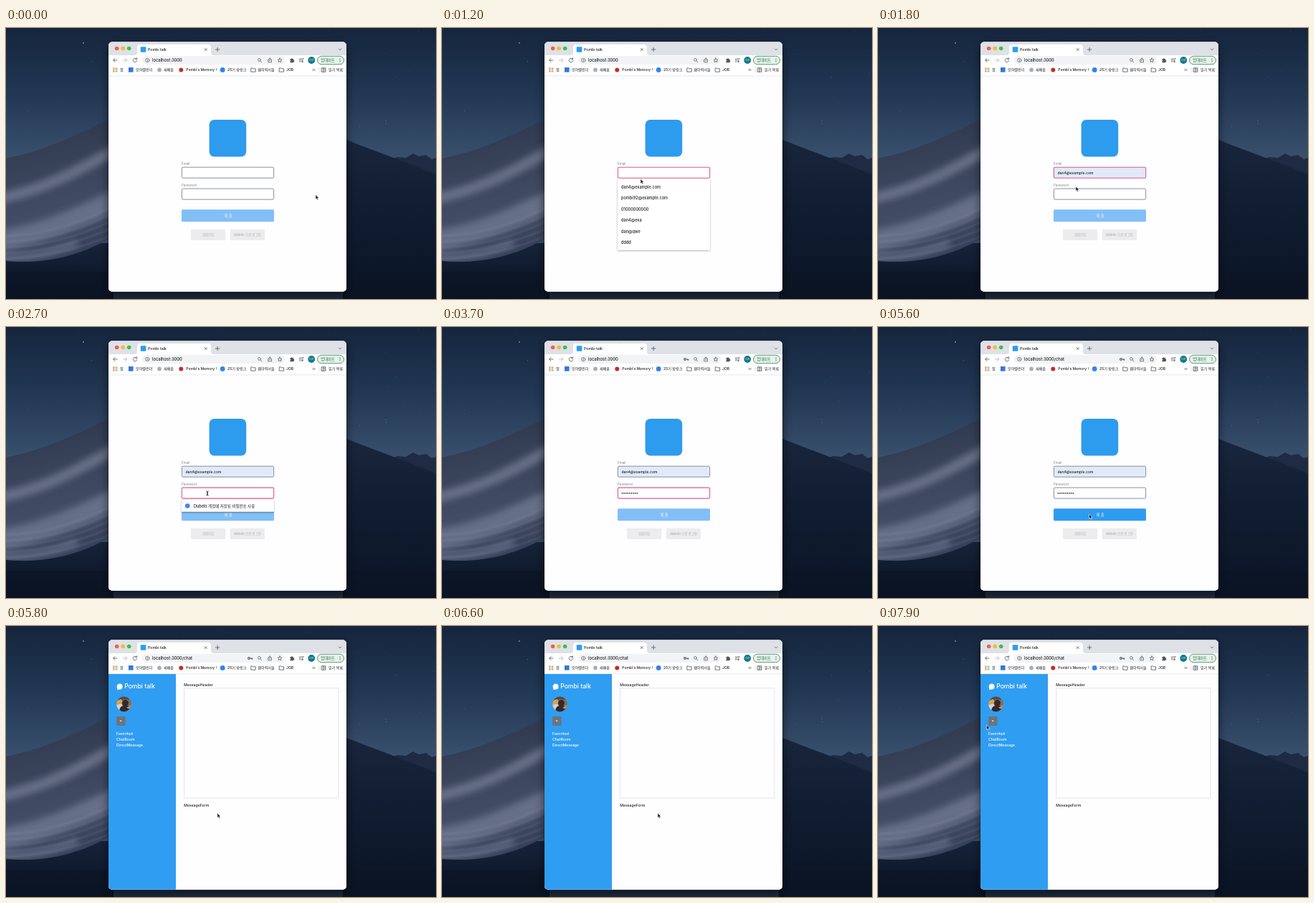
An HTML page that plays this animation: 600 by 378 pixels, repeating every 8000 ms.

```html
<!DOCTYPE html>
<html lang="ko">
<head>
<meta charset="utf-8">
<title>Pombi talk</title>
<style>
html, body { margin: 0; width: 100%; height: 100%; overflow: hidden; background: #101c2e; }
svg { display: block; width: 600px; height: 378px; }
text { font: 500 5.2px Inter, "Noto Sans CJK KR", "Noto Sans CJK", sans-serif; fill: #202124; white-space: pre; }
.line { fill: none; stroke: #5f6368; stroke-width: .9; stroke-linecap: round; stroke-linejoin: round; }
.bar text { font-size: 5.1px; }
.label { font-size: 4.5px; font-weight: 400; fill: #84868c; }
.field { fill: #fff; stroke: #7d8590; stroke-width: .9; }
.field.auto { fill: #e1eaf8; }
.field.focus { stroke: #dc5c8b; stroke-width: 1.1; }
.items text { font-size: 5.6px; }
.mid { text-anchor: middle; }
.side text { fill: #fff; }
#chat text { font-size: 5.15px; }
</style>
</head>
<body>
<svg viewBox="0 0 600 378">
  <defs>
    <linearGradient id="sky" x2="0" y2="1">
      <stop stop-color="#15253d"/><stop offset=".25" stop-color="#223854"/>
      <stop offset=".5" stop-color="#3b526f"/>
    </linearGradient>
    <linearGradient id="dune" x1=".3" y1="0" x2=".45" y2="1">
      <stop stop-color="#2b364c"/><stop offset=".35" stop-color="#384259"/>
      <stop offset=".7" stop-color="#434d66"/><stop offset="1" stop-color="#333e56"/>
    </linearGradient>
    <linearGradient id="ground" x2="0" y2="1">
      <stop stop-color="#16233a"/><stop offset="1" stop-color="#091221"/>
    </linearGradient>
    <linearGradient id="slope" x2="0" y2="1">
      <stop stop-color="#18263d"/><stop offset=".4" stop-color="#111d32"/><stop offset="1" stop-color="#0a1424"/>
    </linearGradient>
    <filter id="blur" x="-20%" y="-50%" width="140%" height="200%"><feGaussianBlur stdDeviation="5"/></filter>
    <filter id="soft"><feGaussianBlur stdDeviation="1"/></filter>
    <filter id="shade" x="-20%" y="-20%" width="140%" height="150%">
      <feDropShadow dx="0" dy="5" stdDeviation="7" flood-color="#000" flood-opacity=".55"/>
    </filter>
    <filter id="lift" x="-10%" y="-20%" width="120%" height="150%">
      <feDropShadow dx="0" dy=".8" stdDeviation=".9" flood-color="#000" flood-opacity=".35"/>
    </filter>
    <clipPath id="frame"><rect x="143" y="19.5" width="332" height="348.3" rx="5"/></clipPath>
    <clipPath id="round"><circle cx="164.5" cy="109" r="10.4"/></clipPath>
    <clipPath id="sand"><path id="hill" d="M0 182C50 172 95 152 150 124V290C105 318 55 330 0 325Z"/></clipPath>
  </defs>

  <!-- desert at night -->
  <rect width="600" height="378" fill="url(#sky)"/>
  <g id="stars" fill="#b9cbe0"></g>
  <path d="M530 185L546 180 558 181 568 175 576 179 586 177 594 183 600 181V215H530Z" fill="#1e2b43"/>
  <path d="M470 154C510 170 550 184 600 204V378H470Z" fill="url(#slope)"/>
  <rect y="300" width="150" height="78" fill="url(#ground)"/>
  <use href="#hill" fill="url(#dune)"/>
  <g clip-path="url(#sand)" fill="none">
    <g stroke="#7f889f" filter="url(#blur)">
      <path d="M-20 240C50 228 100 200 170 160" stroke-width="15" opacity=".65"/>
      <path d="M-20 298C40 292 90 270 170 232" stroke-width="28" opacity=".6"/>
      <path d="M-20 320C30 322 60 316 100 300" stroke-width="9" opacity=".6"/>
    </g>
    <g id="ripples" stroke="#a2a9bd" filter="url(#soft)"></g>
  </g>
  <rect y="340" width="600" height="38" fill="#0b1525" opacity=".6"/>

  <!-- browser -->
  <rect x="143" y="19.5" width="332" height="348.3" rx="5" fill="#fff" stroke="#0a111d" stroke-opacity=".5" stroke-width=".8" filter="url(#shade)"/>
  <g clip-path="url(#frame)">
    <rect x="143" y="19" width="332" height="350" fill="#fefdff"/>
    <rect x="143" y="19" width="332" height="19" fill="#dee1e6"/>
    <path d="M179 38Q183 38 183 34V27Q183 23 187 23H282Q286 23 286 27V34Q286 38 290 38Z" fill="#fff"/>
    <rect x="143" y="38" width="332" height="28.5" fill="#fff"/>
    <path d="M143 66.8H475" stroke="#dfe1e5" stroke-width=".7"/>
    <circle cx="154.7" cy="28.5" r="2.8" fill="#ee5f56"/>
    <circle cx="163.2" cy="28.5" r="2.8" fill="#f2bb33"/>
    <circle cx="171.7" cy="28.5" r="2.8" fill="#3dbf4a"/>
    <rect x="187.8" y="26.2" width="7.6" height="7.6" rx="1" fill="#2c9cf0"/>
    <text x="198" y="31.9">Pombi talk</text>
    <path class="line" d="M277.2 28.6l3 3m0-3l-3 3M292.4 30h5.4m-2.7-2.7v5.4M464.3 29l1.8 1.8 1.8-1.8"/>

    <path class="line" d="M155 45H149.7m2.4-2.5l-2.5 2.5 2.5 2.5"/>
    <path class="line" style="stroke:#b8babd" d="M163.5 45H168.8m-2.4-2.5l2.5 2.5-2.5 2.5"/>
    <path class="line" d="M182.2 43.2A2.8 2.8 0 1 0 182.8 45.6M182.6 41.8v1.9h-1.9"/>
    <rect x="190" y="39" width="199" height="12" rx="6" fill="#f1f3f4"/>
    <circle class="line" cx="197.3" cy="45" r="2.7" style="stroke-width:.7"/>
    <path class="line" d="M197.3 44.8v1.5m0-2.8v.1"/>
    <text id="url" x="204" y="47.1" style="font-size:5.8px"></text>
    <g id="key" class="line"><circle cx="339" cy="45" r="1.4" style="stroke-width:1.2"/><path d="M340.6 45h3.2v1.2m-1.4-1.2v1" style="stroke-width:1.1"/></g>
    <g class="line" style="stroke-width:.8">
      <circle cx="353.5" cy="44.4" r="1.9"/><path d="M355 46l1.8 1.8"/>
      <path d="M366.7 44h-1v3.8h4.8V44h-1M368.1 46v-4m-1.3 1.2l1.3-1.2 1.3 1.2"/>
      <path d="M382 42l.9 2 2.1.2-1.6 1.4.5 2.1-1.9-1.1-1.9 1.1.5-2.1-1.6-1.4 2.1-.2z"/>
      <path d="M409.2 43h4m-4 1.9h3m-3 1.9h2M414 47v-4.5h1.3"/><circle cx="413.2" cy="47" r=".7"/>
    </g>
    <path d="M396.3 43.3h1.5a1 1 0 0 1 2 0h1.6v1.6a1 1 0 0 1 0 2v1.3h-5.1v-1.4a1 1 0 0 0 0-2z" fill="#505458"/>
    <circle cx="426.2" cy="45" r="4.9" fill="#12798a"/>
    <text class="mid" x="426.2" y="46.3" style="font-size:3.6px;fill:#d5ecef">다온</text>
    <rect x="434.5" y="39.3" width="37" height="11.4" rx="5.7" fill="#e8f2ec" stroke="#388056" stroke-width=".8"/>
    <text x="439.3" y="47" style="font-size:5.3px;fill:#1e7340">업데이트</text>
    <path class="line" d="M466 42.9v.1m0 1.9v.1m0 1.9v.1" style="stroke:#286c45;stroke-width:1.2"/>

    <g class="bar">
      <g id="apps"></g>
      <text x="159" y="60.3">앱</text>
      <rect x="171" y="55" width="6.6" height="6.6" fill="#3479d6"/>
      <text x="181" y="60.3">모아캘린더</text>
      <circle cx="214" cy="58.4" r="2.8" fill="#a8adb2"/>
      <text x="220" y="60.3">새배움</text>
      <circle cx="244.3" cy="58.5" r="3" fill="#c52d2d"/>
      <text x="251.3" y="60.3" style="font-size:4.95px">Pombi's Memory !</text>
      <circle cx="302.2" cy="58.4" r="3.4" fill="#3283ed"/>
      <text x="309" y="60.3">25기 방링크</text>
      <path id="folder" class="line" d="M342.2 55.9h2l.8.9h3.2v4.3h-6z"/>
      <text x="351.3" y="60.3">웹이력서들</text>
      <use href="#folder" x="39.4"/>
      <text x="391" y="60.3">JOB</text>
      <path class="line" d="M428 57.2l1.2 1.2-1.2 1.2m2-2.4l1.2 1.2-1.2 1.2"/>
      <path d="M436.8 54.5v8" stroke="#c9ccd0" stroke-width=".6"/>
      <path class="line" d="M440.5 55.8h5.4v5.4h-5.4zM442.5 55.8v5.4m1.4-3.8h1m-1 1.8h1"/>
      <text x="450" y="60.3">읽기 목록</text>
    </g>

    <g id="login">
      <rect x="283.6" y="128" width="51.6" height="51.6" rx="7" fill="#2d9bee"/>
      <text class="label" x="245" y="190.6">Email</text>
      <rect id="email" x="245.4" y="194.2" width="128.2" height="15" rx="1.5"/>
      <text id="mail" x="250.4" y="203.6" style="font-size:5.1px">dan4@example.com</text>
      <text class="label" x="245" y="220.8">Password</text>
      <rect id="pass" x="245.4" y="224.1" width="128.2" height="15" rx="1.5"/>
      <g id="dots" fill="#1b1b1f"></g>
      <rect id="submit" x="245" y="253.3" width="129" height="17" rx="1.5"/>
      <text class="mid" x="310" y="263.8" style="fill:#eef6fe">제 출</text>
      <g fill="#ececee"><rect x="258" y="280.7" width="48.2" height="15.3" rx="1"/><rect x="312.8" y="280.7" width="48.2" height="15.3" rx="1"/></g>
      <g style="opacity:.32">
        <text class="mid" x="282" y="290" style="font-size:4.4px">회원가입</text>
        <text class="mid" x="337" y="290" style="font-size:4.5px">dubelo 으로 로그인</text>
      </g>
      <g id="list" class="items">
        <path d="M245 210.5H374V308.5q0 1.5-1.5 1.5H246.5q-1.5 0-1.5-1.5Z" fill="#fff" filter="url(#lift)"/>
        <rect id="row" x="245" y="214.3" width="129" height="15.4" fill="#ebebed"/>
      </g>
      <g id="saved">
        <path d="M245 241H374V258H245Z" fill="#fff" filter="url(#lift)"/>
        <path d="M245 258.2H374" stroke="#5b8a8f" stroke-width=".7"/>
        <circle cx="253.2" cy="249.5" r="3.3" fill="#4285f4"/>
        <text x="262" y="251.5" style="font-size:5.5px">Dubelo 계정에 저장된 비밀번호 사용</text>
      </g>
    </g>

    <g id="chat">
      <g class="side">
        <rect x="143" y="67" width="94" height="301" fill="#2f9df1"/>
        <path d="M158.6 80.6a4 3.9 0 1 1 0 7.8l-3.8.4.6-1.9a4 3.9 0 0 1 3.2-6.3z" fill="#fff"/>
        <text x="165.2" y="87.4" style="font-size:8.6px">Pombi talk</text>
        <g clip-path="url(#round)">
          <rect x="154" y="98" width="21" height="22" fill="#8d6a4b"/>
          <path d="M154 98h21v5l-10-1-11 4z" fill="#4b4a52"/>
          <path d="M154 104l7-2 2 5-9 3z" fill="#dda452"/>
          <path d="M154 110l7-2 2 4-3 8h-6z" fill="#d9d2c7"/>
          <path d="M158 120q0-8 6-9a4.4 4.4 0 1 1 5 0q6 1 6 9z" fill="#30292f"/>
          <path d="M168 114l8-5v9z" fill="#c98b58"/>
        </g>
        <rect x="154" y="126" width="12.6" height="13" rx="1.3" fill="#6b747d"/>
        <path d="M158.5 131.8h3.4l-1.7 1.8z" fill="#fff"/>
        <text x="154" y="152">Favorited</text>
        <text x="154" y="160.1">ChatRoom</text>
        <text x="154" y="168.3">DirectMessage</text>
      </g>
      <text x="248.3" y="83.8">MessageHeader</text>
      <rect x="248.7" y="86.7" width="215.1" height="153.3" fill="none" stroke="#dfe2e7" stroke-width=".9"/>
      <text x="248.3" y="252">MessageForm</text>
    </g>
  </g>

  <g id="cursor">
    <path id="arrow" d="M0 0V6.5L1.5 5.2 2.5 7.5 3.7 7 2.7 4.8H4.7Z" fill="#111" stroke="#fff" stroke-width=".6"/>
    <path id="beam" class="line" style="stroke:#222" d="M-1.3-3Q0-3 0-2V2Q0 3-1.3 3M1.3-3Q0-3 0-2V2Q0 3 1.3 3"/>
  </g>
</svg>
<script>
const $ = id => document.getElementById(id);
const add = (id, markup) => $(id).insertAdjacentHTML('beforeend', markup);
const show = (id, on) => $(id).style.display = on ? '' : 'none';

let seed = 7;
const rnd = () => (seed = seed * 16807 % 2147483647) / 2147483647;
for (let i = 0; i < 70; i++)
  add('stars', `<circle cx="${rnd() * 600}" cy="${rnd() * 150}" r="${.2 + rnd() * .3}" opacity="${.2 + rnd() * .5}"/>`);
add('stars', '<circle cx="108" cy="21" r=".8"/>');
for (let i = 0; i < 5; i++) {
  const y = 284 + i * 8;
  add('ripples', `<path d="M0 ${y + 6}Q75 ${y + 4} 150 ${y - 36 + i * 2}" stroke-width="1.6" opacity=".22"/>`);
}
const tints = ['#e0564a', '#edb63a', '#4a9c5d', '#4382dd'];
for (let i = 0; i < 9; i++)
  add('apps', `<rect x="${149.3 + i % 3 * 2.2}" y="${55.5 + (i / 3 | 0) * 2.2}" width="1.5" height="1.5" fill="${tints[(i + (i / 3 | 0)) % 4]}"/>`);
['dan4@example.com', 'pombi92@example.com', '01000000000', 'dan4@exa', 'dan@qwe', 'dddd']
  .forEach((s, i) => add('list', `<text x="250" y="${224 + i * 15.4}">${s}</text>`));
for (let i = 0; i < 9; i++)
  add('dots', `<circle cx="${251.5 + i * 2.6}" cy="231.8" r=".85"/>`);

// pointer stops: time, x, y
const path = [
  [0, 432, 232.5], [200, 432, 232.5], [900, 278, 203], [1000, 278, 203],
  [1200, 277, 210.5], [1500, 276, 221], [1900, 276, 221], [2400, 281, 232],
  [3800, 281, 232], [4300, 277.5, 276], [4400, 277.5, 276], [4700, 291, 263],
  [5200, 294.5, 261], [5700, 294.5, 261], [6400, 301, 261], [6700, 301, 261],
  [7700, 151.5, 138], [8000, 151.5, 138]
];
function pointer(t) {
  const i = path.findIndex(p => p[0] > t);
  const [t0, x0, y0] = path[i - 1], [t1, x1, y1] = path[i];
  const u = (t - t0) / (t1 - t0), e = u * u * (3 - 2 * u);
  return [x0 + (x1 - x0) * e, y0 + (y1 - y0) * e];
}

function draw(t) {
  const within = (a, b) => t >= a && t < b;
  const [x, y] = pointer(t);
  const inChat = t >= 5700, filled = t >= 1400;
  const over = (top, bottom) => !inChat && x > 245 && x < 374 && y > top && y < bottom;
  const typed = t < 2900 ? 0 : t < 3400 ? (t - 2800) / 100 : Math.min(9, 6 + Math.max(0, (t - 3400) / 100));

  show('login', !inChat);
  show('chat', inChat);
  show('key', t >= 2900);
  $('url').textContent = 'localhost:3000' + (t >= 5500 ? '/chat' : '');

  $('email').setAttribute('class', 'field' + (filled ? ' auto' : '') + (within(900, 2400) ? ' focus' : ''));
  $('pass').setAttribute('class', 'field' + (within(2400, 5000) ? ' focus' : ''));
  show('mail', filled);
  show('list', within(1000, 1700));
  show('row', filled);
  show('saved', within(2500, 2900));
  [...$('dots').children].forEach((dot, i) => dot.style.display = i < typed ? '' : 'none');
  $('submit').setAttribute('fill', over(253, 270) ? '#2d9cf0' : '#82bff7');

  const beam = over(194, 209.5) || over(224, 239.5);
  show('cursor', !within(2900, 3900));
  show('beam', beam);
  show('arrow', !beam);
  $('cursor').setAttribute('transform', `translate(${x} ${y})`);
}

function tick() {
  draw(Math.floor(performance.now() % 8000 / 100) * 100);
  requestAnimationFrame(tick);
}
tick();
</script>
</body>
</html>
```
